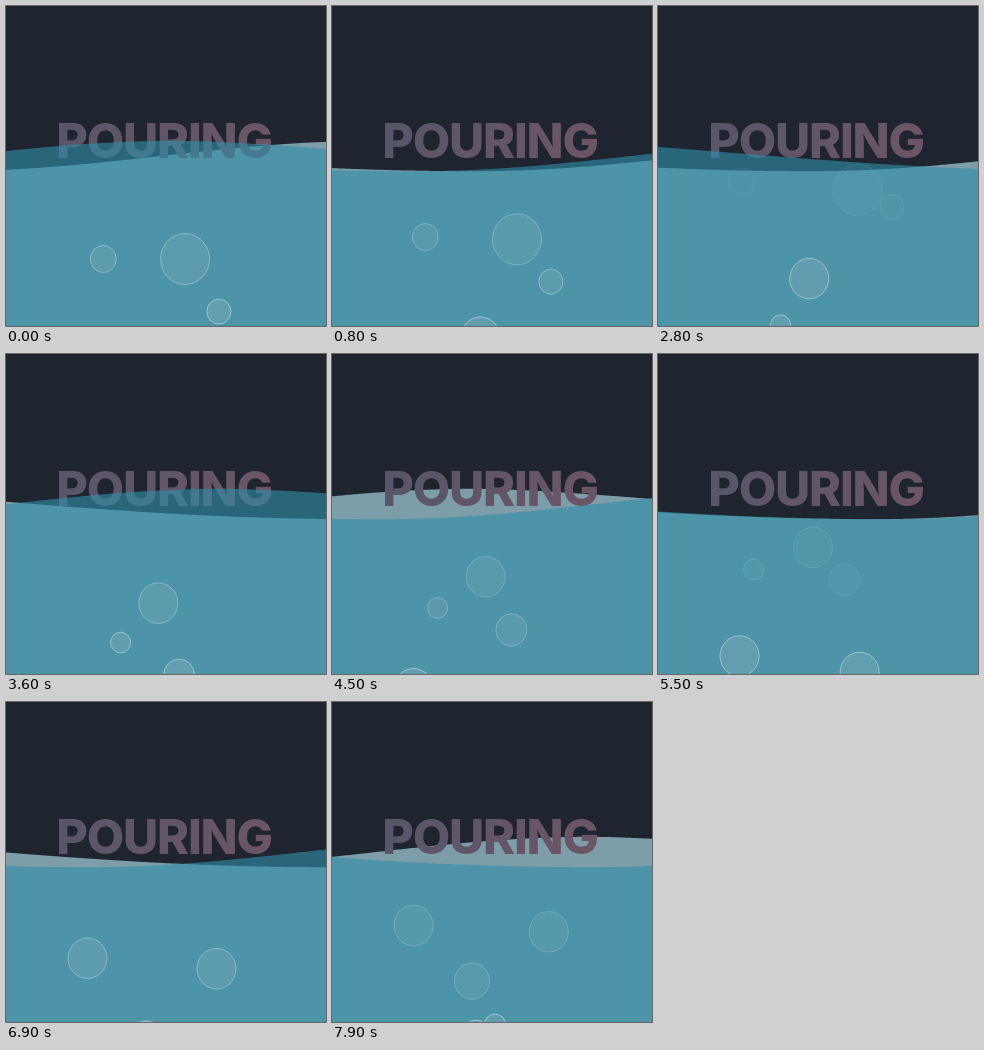
Recreate the animation shown at these times as an HTML page with a canvas. Size 320 by 320 pixels, loop 8000 ms.

```html
<!DOCTYPE html>
<html lang="en">
<head>
<meta charset="utf-8">
<title>Pouring</title>
<style>
  html, body { margin: 0; width: 320px; height: 320px; overflow: hidden; background: #1f252e; }
  canvas { display: block; }
</style>
</head>
<body>
<canvas id="stage" width="320" height="320"></canvas>
<script>
const ctx = document.getElementById('stage').getContext('2d');
const SIZE = 320, LOOP = 8000, STEP = 100;

// A wave has a short rising side and a longer falling side.
const RISE = 430, FALL = 570, LENGTH = RISE + FALL;
const MID = 150, AMP = 15.2;

// Each wave travels at a steady rate, in wavelengths per second.
const back = { start: .94, rate: 1.505, color: '#7d9ea9' };
const front = { start: .74, rate: -.82, color: 'rgba(49, 143, 170, .62)' };

// Bubbles rise in straight lines from below the stage.
const BOTTOM = 340;
const bubble = (birth, x, drift, rise, radius) => ({ birth, x, drift, rise, radius });
const bubbles = [
  bubble(-3.52, 153, 7.4, 24.7, 24.5),
  bubble(-3.15, 113, -5, 27.6, 13),
  bubble(-.92, 206, 7.5, 37.4, 12),
  bubble(.5, 148, 1.4, 29.3, 19.5),
  bubble(2.26, 128, -10, 38.4, 10),
  bubble(3.23, 170.5, 7, 50.5, 15.5),
  bubble(4.34, 81.5, 0, 32.7, 19.5),
  bubble(4.92, 198, 6.3, 37, 19.5),
  bubble(6.85, 140, 0, 58, 17.5),
  bubble(7.43, 163, 0, 35, 11),
  bubble(7.63, 144, 0, 35, 12)
];

function waveY(x, phase) {
  const d = ((x - phase * LENGTH) % LENGTH + LENGTH) % LENGTH;
  return d < RISE
    ? MID + AMP * Math.cos(Math.PI * d / RISE)
    : MID - AMP * Math.cos(Math.PI * ((d - RISE) / FALL) ** .8);
}

function drawWave({ start, rate, color }, t) {
  ctx.beginPath();
  ctx.moveTo(0, SIZE);
  for (let x = 0; x <= SIZE; x += 2) ctx.lineTo(x, waveY(x, start + rate * t));
  ctx.lineTo(SIZE, SIZE);
  ctx.fillStyle = color;
  ctx.fill();
}

function drawText() {
  const tint = ctx.createLinearGradient(52, 0, 265, 0);
  tint.addColorStop(0, '#585669');
  tint.addColorStop(1, '#6c5565');
  ctx.fillStyle = tint;
  ctx.font = '800 48.5px Inter, sans-serif';
  ctx.letterSpacing = '-1.2px';
  ctx.textAlign = 'center';
  ctx.fillText('POURING', 158, 152);
}

function drawBubble({ birth, x, drift, rise, radius }, t) {
  const age = t - birth;
  const y = BOTTOM - rise * age;
  // Fast bubbles vanish deeper in the water.
  const fadeY = 165 + 2 * Math.max(0, rise - 30);
  if (age < 0 || y <= fadeY) return;
  ctx.globalAlpha = Math.min(1, (y - fadeY) / 115);
  ctx.beginPath();
  ctx.ellipse(x + drift * age, y, radius, radius * 1.04, 0, 0, 2 * Math.PI);
  ctx.fillStyle = 'rgba(205, 210, 205, .16)';
  ctx.fill();
  ctx.strokeStyle = 'rgba(255, 255, 255, .4)';
  ctx.stroke();
  ctx.globalAlpha = 1;
}

function draw(now) {
  const t = Math.floor(now % LOOP / STEP) * STEP / 1000;
  ctx.fillStyle = '#1f252e';
  ctx.fillRect(0, 0, SIZE, SIZE);
  drawWave(back, t);
  drawText();
  drawWave(front, t);
  bubbles.forEach(b => drawBubble(b, t));
}

const start = performance.now();
function tick() {
  draw(performance.now() - start);
  requestAnimationFrame(tick);
}
tick();
</script>
</body>
</html>
```
